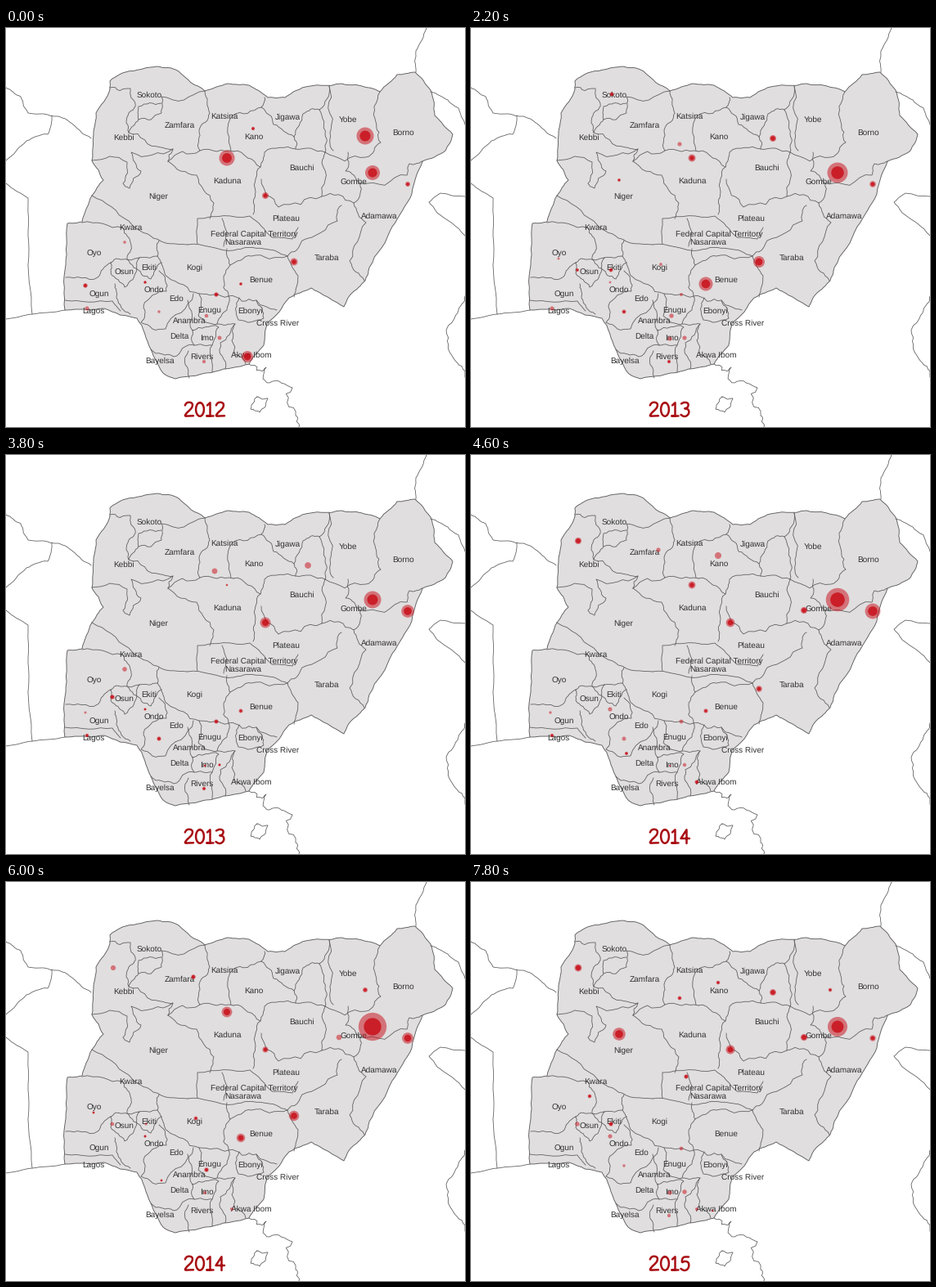
Write a matplotlib script that moves like this. It is 561 by 488 pixels and loops after 8000 ms.

```python
import numpy as np
import matplotlib.pyplot as plt
from matplotlib.animation import FuncAnimation
from matplotlib.collections import PatchCollection
from matplotlib.patches import Circle

W, H, DPI = 561, 488, 100
FRAMES, STEP = 40, 200
PX = 72 / DPI
LAND, LINE, TEXT, RED, YEAR_RED = "#e0dedf", "#5c5c5c", "#333333", "#c80a14", "#a80f14"

plt.rcParams["text.hinting"] = "none"
fig = plt.figure(figsize=(W / DPI, H / DPI), dpi=DPI, facecolor="white")
ax = fig.add_axes([0, 0, 1, 1])
ax.set_xlim(0, W)
ax.set_ylim(H, 0)
ax.axis("off")
rng = np.random.default_rng(4)


def rough(flat, amount, rounds=3):
    """Midpoint displacement: a few key points become a ragged line."""
    pts = np.array(flat, float).reshape(-1, 2)
    for _ in range(rounds):
        a, b = pts[:-1], pts[1:]
        side = (b - a)[:, ::-1] * [1, -1]
        out = np.empty((len(pts) * 2 - 1, 2))
        out[::2] = pts
        out[1::2] = (a + b) / 2 + side * rng.uniform(-amount, amount, (len(a), 1))
        pts = out
    return pts


def border(*flat, amount=0.16):
    ax.plot(*rough(flat, amount).T, color=LINE, lw=0.8 * PX, zorder=2,
            solid_joinstyle="round")


# Country outline, clockwise from the north-west corner
north = [127, 65, 146, 54, 185, 47, 211, 53, 243, 77, 271, 68, 297, 70, 320, 85,
         341, 85, 362, 73, 410, 68, 457, 78, 478, 57, 500, 54]
east = [519, 76, 524, 107, 546, 130, 537, 150, 509, 163, 496, 203, 472, 243,
        444, 293, 439, 309, 422, 325, 413, 341, 391, 328, 373, 318, 346, 330,
        319, 361, 315, 388, 297, 411]
south = [256, 420, 207, 429, 192, 422, 177, 393, 160, 355, 120, 343, 72, 345]
west = [73, 290, 75, 239, 93, 237, 105, 205, 119, 186, 105, 162, 107, 130,
        110, 104, 127, 75, 127, 65]
ax.fill(*rough(north + east + south + west, 0.06).T, fc=LAND, ec=LINE,
        lw=0.9 * PX, zorder=1)

# Neighbouring countries, coast and island
border(0, 73, 18, 84, 27, 104, 64, 108, 82, 118, 104, 135, amount=0.08)
border(0, 162, 25, 138, 51, 130, 56, 107, amount=0.08)
border(0, 190, 27, 208, 28, 270, 32, 350, amount=0.03)
border(0, 356, 32, 350, 72, 345, amount=0.03)
border(514, 0, 501, 28, 501, 54, amount=0.06)
border(519, 78, 540, 88, 553, 98, 561, 118, amount=0.08)
border(561, 206, 531, 202, 517, 213, 527, 226, 561, 254, amount=0.05)
border(561, 328, 553, 345, 538, 370, 547, 404, 561, 427)
border(297, 411, 318, 415, 322, 434, 350, 440, 354, 474, 358, 488, amount=0.3)
border(307, 451, 320, 453, 310, 470, 299, 466, 307, 451)

# State borders: north
border(127, 73, 152, 74, 158, 96, 150, 104, 150, 128, 189, 146, 204, 148)
border(150, 128, 162, 112, 190, 104, 190, 84, 243, 77)
border(162, 112, 162, 96, 190, 92)
border(243, 77, 249, 104, 236, 125, 237, 150)
border(198, 163, 237, 150, 278, 151)
border(105, 162, 148, 164, 143, 190, 151, 196, 165, 175, 153, 152, 204, 148, 198, 163)
border(275, 150, 277, 107, 312, 97, 316, 85)
border(312, 97, 327, 118, 352, 133, 363, 105, 383, 100, 395, 71)
border(352, 133, 354, 148)
border(383, 100, 390, 130, 390, 152)
border(278, 151, 311, 170, 316, 152, 354, 148, 390, 152)
border(395, 71, 397, 125, 400, 150)
border(457, 78, 452, 115, 458, 140, 440, 158, 390, 152)

# Centre and east
border(198, 163, 233, 180, 254, 214, 249, 233)
border(311, 170, 305, 200, 302, 228)
border(312, 185, 333, 219, 386, 206, 386, 165, 390, 152)
border(418, 152, 415, 175, 433, 190, 425, 214, 386, 206)
border(433, 190, 490, 180, 493, 166, 509, 163)
border(425, 214, 440, 238, 420, 285, 438, 309)
border(410, 217, 405, 236, 362, 260, 344, 279)
border(234, 264, 234, 233, 298, 230, 325, 256, 350, 258, 357, 244, amount=0.06)
border(264, 233, 266, 267)
border(222, 265, 278, 272, 315, 270, 344, 279, 357, 303, 352, 329, amount=0.08)
border(344, 279, 300, 279, 274, 290)
border(270, 270, 274, 290, 266, 305, 272, 328)

# West and south
border(105, 205, 150, 236, 180, 257, 222, 265, amount=0.08)
border(93, 238, 143, 245, 153, 265, 148, 283, 185, 279, 190, 287, 177, 307,
       160, 295, 163, 281)
border(185, 279, 187, 260)
border(128, 287, 148, 283, 160, 295, 145, 317, 128, 300, 128, 287, 112, 305, 73, 305)
border(72, 333, 130, 334, 140, 346, amount=0.05)
border(133, 313, 135, 330, 152, 350)
border(187, 297, 196, 322, 168, 340, 165, 360, 195, 368, 229, 325)
border(190, 287, 197, 304, 236, 325, 272, 328, 306, 333, 331, 345)
border(236, 325, 235, 352, 258, 362, 272, 338, 272, 328)
border(285, 330, 284, 357, 315, 355, 306, 333)
border(222, 333, 228, 370, 260, 366, 252, 388, 230, 388, 228, 370)
border(258, 362, 280, 362, 262, 385, 268, 417)
border(280, 362, 276, 382, 293, 411)
border(177, 393, 205, 402, 230, 388)
border(252, 388, 252, 421)
border(223, 395, 224, 428)

LABELS = {
    "Sokoto": (175, 81), "Zamfara": (212, 118), "Katsina": (267, 107),
    "Jigawa": (344, 108), "Yobe": (418, 111), "Borno": (486, 127),
    "Kebbi": (144, 133), "Kano": (303, 132), "Bauchi": (361, 170),
    "Gombe": (425, 187), "Kaduna": (270, 186), "Niger": (186, 205),
    "Plateau": (342, 232), "Adamawa": (456, 229), "Kwara": (152, 243),
    "Federal Capital Territory": (303, 251), "Nasarawa": (290, 261),
    "Taraba": (392, 280), "Oyo": (108, 275), "Osun": (144, 298),
    "Ekiti": (175, 292), "Kogi": (230, 292), "Benue": (312, 307),
    "Ogun": (114, 325), "Ondo": (181, 319), "Edo": (208, 330),
    "Enugu": (249, 344), "Ebonyi": (298, 345), "Lagos": (107, 345),
    "Anambra": (224, 357), "Cross River": (332, 360), "Delta": (212, 376),
    "Imo": (245, 378), "Rivers": (239, 401), "Akwa Ibom": (300, 399),
    "Bayelsa": (188, 406),
}
for name, (x, y) in LABELS.items():
    ax.text(x, y + 3.6, name, family="Liberation Sans", size=10 * PX, color=TEXT,
            ha="center", va="baseline", zorder=3)

# Busy places: radius at a few months, eased linearly between them
MONTHS = [0, 5, 11, 19, 27, 34, 39]
BUSY = {
    (439, 132): [10.5, 3, 0, 0, 1.3, 5.3, 2.3],
    (448, 177): [9, 7.5, 12.5, 10.5, 18, 16, 12],
    (270, 159): [9.5, 6.5, 4.5, 1.3, 7.5, 5, 0],
    (317, 205): [4, 6.5, 0, 6.5, 4.2, 2.8, 5.5],
    (491, 191): [3, 2.5, 3.8, 7.8, 11, 1.3, 3.7],
    (352, 286): [4.5, 4.5, 7, 0, 7.5, 4.5, 0],
    (287, 313): [2, 1.6, 8.5, 2.5, 2.8, 8.5, 0],
    (181, 186): [0, 0, 2, 0, 0, 0, 7.8],
    (295, 402): [7, 0, 0, 0, 0, 1.5, 1.3],
}
# Quiet places flicker at random: larger dots in the north, small in the south
NORTH = [(172, 81), (229, 116), (302, 123), (369, 135), (407, 190), (255, 142),
         (131, 105)]
SOUTH = [(257, 326), (245, 352), (276, 400), (97, 315), (261, 379), (243, 380),
         (263, 238), (145, 262), (107, 282), (130, 296), (171, 296), (170, 311),
         (232, 289), (187, 347), (190, 365), (99, 343), (242, 408)]


def month(n):
    """All (place, outer radius, inner radius) of one month."""
    found = []
    for place, sizes in BUSY.items():
        r = np.interp(n, MONTHS, sizes)
        if r > 1:
            found.append((place, r, 0.62 * r))
    r = np.random.default_rng(100 + n)
    for places, size, chance in ((NORTH, 3.2, 0.35), (SOUTH, 2, 0.55)):
        for place in places:
            if r.random() < chance:
                outer = size * r.uniform(0.65, 1.4)
                found.append((place, outer, outer * r.choice([0, 0.7])))
    return found


# Handwritten digits in an 11 x 18 box
turn = np.linspace(-np.pi / 2, 1.5 * np.pi, 30)
STROKES = {
    "0": np.c_[5.5 + 4.9 * np.cos(turn), 9 + 8.3 * np.sin(turn)],
    "1": [(1, 4), (4.5, 0.8), (4.5, 17), (0.5, 17), (8.5, 17)],
    "2": [(0.8, 4), (2.5, 1), (6, 0), (10, 1.5), (9.8, 6), (7, 9.5), (3, 13),
          (0, 17.3), (5, 17), (11, 16.8)],
    "3": [(1, 2), (5, 0), (10, 1.5), (9, 7), (4, 8), (9.5, 8.5), (10.8, 13),
          (8, 17), (4, 17.8), (0.5, 15.5)],
    "4": [(7.5, 17.5), (7.5, 0.8), (0.5, 11.5), (11, 11.5)],
    "5": [(10, 1), (2.6, 1), (1.4, 8.5), (5, 6), (10, 7.5), (10.5, 13), (8, 17),
          (4, 17.8), (0.5, 15.5)],
}


def smooth(pts):
    for _ in range(3):
        a, b = pts[:-1], pts[1:]
        cut = np.stack([0.75 * a + 0.25 * b, 0.25 * a + 0.75 * b], 1).reshape(-1, 2)
        pts = np.vstack([pts[:1], cut, pts[-1:]])
    return pts


def glyph(ch):
    pts = np.array(STROKES[ch], float)
    return smooth(pts) if ch in "235" else pts


def dot_layer(alpha, zorder):
    layer = PatchCollection([], facecolor=RED, edgecolor="none", alpha=alpha,
                            zorder=zorder)
    return ax.add_collection(layer, autolim=False)


outer_dots, inner_dots = dot_layer(0.5, 4), dot_layer(0.8, 5)
digits = [ax.plot([], [], color=YEAR_RED, lw=2.5 * PX, solid_capstyle="round",
                  solid_joinstyle="round", zorder=6)[0] for _ in range(4)]


def draw(n):
    found = month(n)
    outer_dots.set_paths([Circle(place, r) for place, r, _ in found])
    inner_dots.set_paths([Circle(place, r) for place, _, r in found if r])
    year = str(2012 + (n + 3) // 12)
    for line, ch, x in zip(digits, year, (218, 231.5, 245, 256)):
        line.set_data(*(glyph(ch) + [x, 457.5]).T)
    return [outer_dots, inner_dots, *digits]


anim = FuncAnimation(fig, draw, frames=FRAMES, interval=STEP, repeat=True,
                     repeat_delay=0, blit=False)
plt.show()
```
